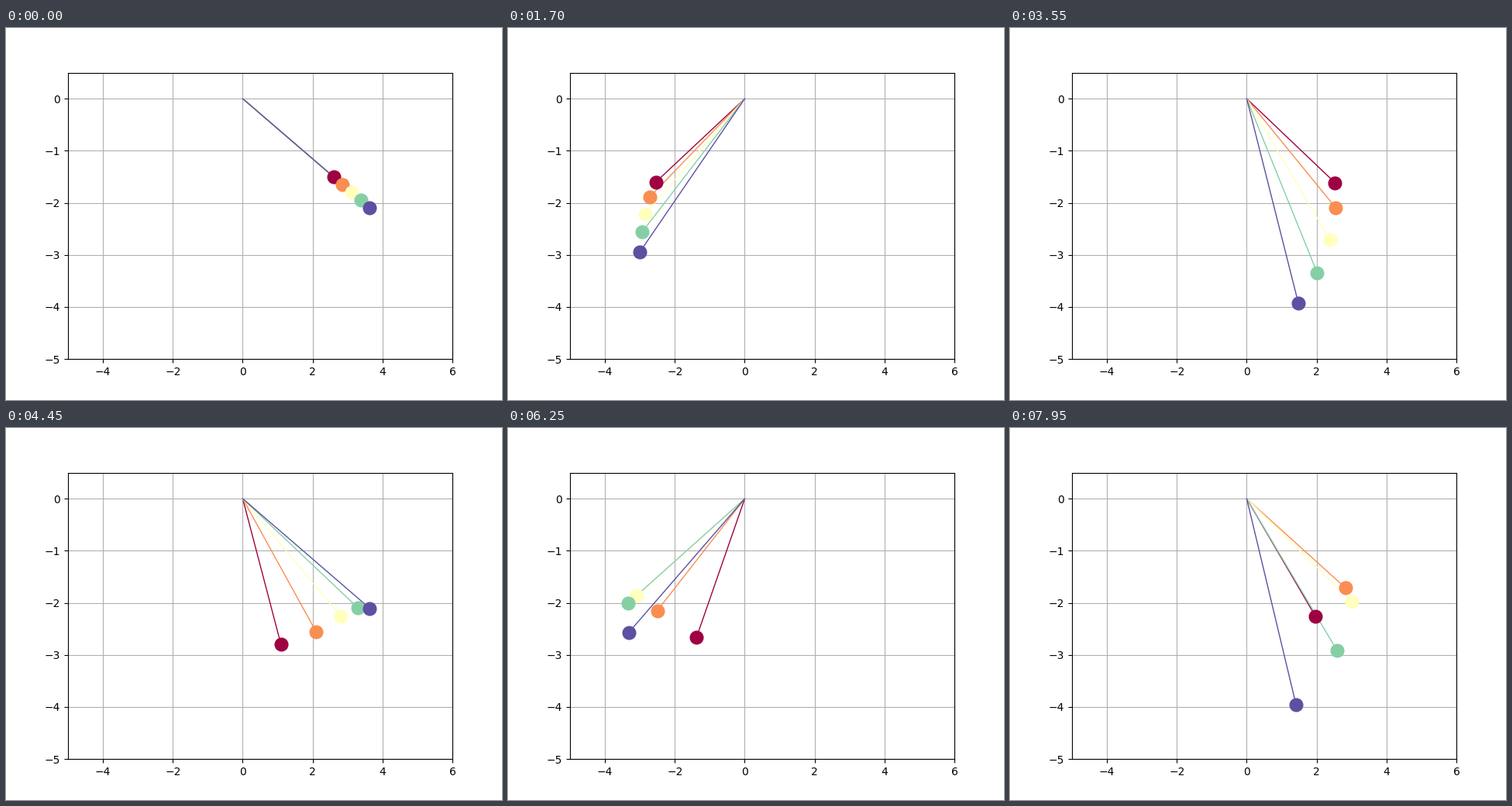
Recreate the animation shown at these times as a matplotlib script. Size 640 by 480 pixels, loop 8000 ms.

```python
import numpy as np
import matplotlib.pyplot as plt
from matplotlib.animation import FuncAnimation

G = 9.81
FRAMES = 160
STEP_MS = 50
SUBSTEPS = 10
LENGTHS = np.linspace(3, 4.2, 5)
COLORS = plt.get_cmap("Spectral")(np.linspace(0, 1, 5))


def slope(state):
    angle, speed = state
    return np.array([speed, -G / LENGTHS * np.sin(angle)])


def rk4(state, h):
    k1 = slope(state)
    k2 = slope(state + h / 2 * k1)
    k3 = slope(state + h / 2 * k2)
    k4 = slope(state + h * k3)
    return state + h / 6 * (k1 + 2 * k2 + 2 * k3 + k4)


def swing():
    """Angles of all pendulums for every frame, released at 60 degrees."""
    state = np.array([np.full(5, np.pi / 3), np.zeros(5)])
    angles = []
    for _ in range(FRAMES):
        angles.append(state[0])
        for _ in range(SUBSTEPS):
            state = rk4(state, STEP_MS / 1000 / SUBSTEPS)
    return np.array(angles)


ANGLES = swing()
XS = LENGTHS * np.sin(ANGLES)
YS = -LENGTHS * np.cos(ANGLES)

fig, ax = plt.subplots(figsize=(6.4, 4.8), dpi=100)
ax.set_xlim(-5, 6)
ax.set_ylim(-5, 0.5)
ax.grid()

rods = [ax.plot([], [], color=c, lw=1)[0] for c in COLORS]
bobs = [ax.plot([], [], "o", color=c, ms=12)[0] for c in COLORS]


def update(frame):
    for rod, bob, x, y in zip(rods, bobs, XS[frame], YS[frame]):
        rod.set_data([0, x], [0, y])
        bob.set_data([x], [y])
    return rods + bobs


anim = FuncAnimation(fig, update, frames=FRAMES, interval=STEP_MS,
                     init_func=lambda: update(0), repeat=True, repeat_delay=0)
plt.show()
```
